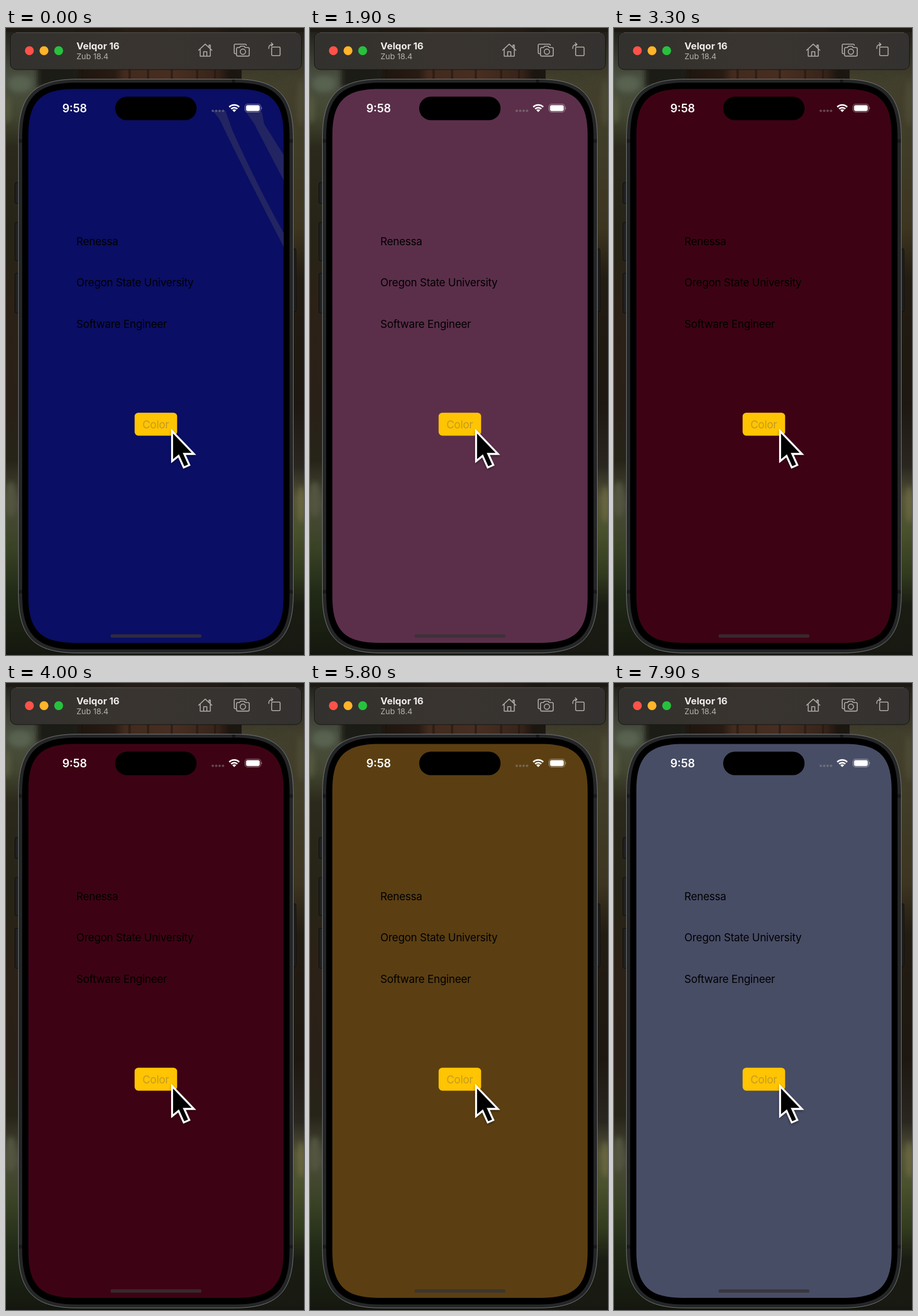
An HTML page that plays this animation: 516 px wide and 1085 px high, repeating every 8000 ms.

```html
<!DOCTYPE html>
<html lang="en">
<head>
<meta charset="utf-8">
<title>Color button</title>
<style>
html, body { margin: 0; width: 100%; height: 100%; overflow: hidden; background: #15150f; }
svg { display: block; width: 516px; height: 1085px; }
text { font-family: Inter, Roboto, sans-serif; }
.label { font-size: 18.5px; letter-spacing: -0.24px; }
</style>
</head>
<body>
<svg viewBox="0 0 516 1085">
  <defs>
    <linearGradient id="left" x2="0" y2="1">
      <stop offset="0" stop-color="#201f18"/>
      <stop offset=".08" stop-color="#4b5142"/>
      <stop offset=".14" stop-color="#424630"/>
      <stop offset=".19" stop-color="#2b291b"/>
      <stop offset=".32" stop-color="#262417"/>
      <stop offset=".45" stop-color="#2c2117"/>
      <stop offset=".6" stop-color="#292017"/>
      <stop offset=".69" stop-color="#262418"/>
      <stop offset=".76" stop-color="#4b4b38"/>
      <stop offset=".83" stop-color="#394225"/>
      <stop offset=".9" stop-color="#212a16"/>
      <stop offset="1" stop-color="#14170e"/>
    </linearGradient>
    <linearGradient id="right" x2="0" y2="1">
      <stop offset="0" stop-color="#201e16"/>
      <stop offset=".08" stop-color="#423f2d"/>
      <stop offset=".2" stop-color="#403c27"/>
      <stop offset=".32" stop-color="#3d3520"/>
      <stop offset=".4" stop-color="#221c13"/>
      <stop offset=".6" stop-color="#1e1711"/>
      <stop offset=".7" stop-color="#2a2720"/>
      <stop offset=".75" stop-color="#555338"/>
      <stop offset=".8" stop-color="#4a512d"/>
      <stop offset=".87" stop-color="#323b1e"/>
      <stop offset=".92" stop-color="#1a1c13"/>
      <stop offset="1" stop-color="#181912"/>
    </linearGradient>
    <linearGradient id="trunk">
      <stop offset="0" stop-color="#1d150f"/>
      <stop offset=".24" stop-color="#281b13"/>
      <stop offset=".3" stop-color="#422a1e"/>
      <stop offset=".6" stop-color="#482e21"/>
      <stop offset=".85" stop-color="#37241a"/>
      <stop offset=".93" stop-color="#1c1510"/>
      <stop offset="1" stop-color="#1c1711"/>
    </linearGradient>
    <linearGradient id="bar">
      <stop offset="0" stop-color="#32312d"/>
      <stop offset=".45" stop-color="#393430"/>
      <stop offset="1" stop-color="#343230"/>
    </linearGradient>
    <filter id="soft" x="-50%" y="-50%" width="200%" height="200%"><feGaussianBlur stdDeviation="4"/></filter>
    <filter id="shadow" x="-30%" y="-30%" width="170%" height="170%">
      <feDropShadow dx="0" dy="2" stdDeviation="2" flood-opacity=".4"/>
    </filter>
    <clipPath id="clip"><path id="clipShape"/></clipPath>
  </defs>

  <!-- forest -->
  <rect width="260" height="1085" fill="url(#left)"/>
  <rect x="260" width="256" height="1085" fill="url(#right)"/>
  <rect x="118" width="290" height="100" fill="url(#trunk)"/>
  <path d="M214 70V92M246 70V92M287 70V92M331 70V92M362 70V92" stroke="#24170f" stroke-width="4" opacity=".6"/>
  <g filter="url(#soft)">
    <rect x="54" y="60" width="72" height="44" fill="#1f1e16"/>
    <ellipse cx="24" cy="97" rx="20" ry="14" fill="#59624f"/>
    <ellipse cx="2" cy="140" rx="6" ry="24" fill="#55583f"/>
    <ellipse cx="460" cy="84" rx="30" ry="7" fill="#3c3e2a"/>
    <ellipse cx="511" cy="130" rx="6" ry="40" fill="#4e4b34"/>
    <ellipse cx="8" cy="815" rx="10" ry="30" fill="#525441"/>
    <ellipse cx="511" cy="825" rx="6" ry="32" fill="#6a683f"/>
  </g>
  <rect width="516" height="7" fill="#1d1912" opacity=".75"/>
  <rect y="1079" width="516" height="6" fill="#151711" opacity=".7"/>

  <!-- toolbar -->
  <rect x="7.5" y="7" width="504" height="65" rx="10" fill="url(#bar)" stroke="#171512"/>
  <path d="M17 8H502" stroke="#57524d"/>
  <circle cx="40.5" cy="39.2" r="7.7" fill="#ff5249"/>
  <circle cx="65.8" cy="39.2" r="7.7" fill="#ffb429"/>
  <circle cx="91.2" cy="39.2" r="7.7" fill="#27c23d"/>
  <text x="122" y="36.5" font-size="16.5" font-weight="700" fill="#efedeb">Velqor 16</text>
  <text x="122" y="54" font-size="13.7" fill="#b5b2ae">Zub 18.4</text>
  <g fill="none" stroke="#b1aeaa" stroke-width="1.6" stroke-linejoin="round" stroke-linecap="round">
    <path d="M333.5 38.5L345 27.8L356.5 38.5M336.3 36.5V48.7H353.7V36.5M351.5 33.5V29.5H353.7V35.5M342.3 48.5V41H347.7V48.5"/>
    <path d="M398 44.5H397.2Q395.2 44.5 395.2 42.5V30Q395.2 28 397.2 28H414Q416 28 416 30"/>
    <path d="M401.5 33.8H404.5L406 31.5H412.5L414 33.8H418.8Q421.2 33.8 421.2 36V46.4Q421.2 48.6 418.8 48.6H401.5Q399.2 48.6 399.2 46.4V36Q399.2 33.8 401.5 33.8Z"/>
    <circle cx="410.2" cy="41" r="4.6"/>
    <rect x="460" y="33" width="14.6" height="14.7" rx="1.5"/>
    <path d="M455 35.5Q454.5 28.5 462 28.5M459.5 25.8L462.3 28.5L459.5 31.2"/>
  </g>

  <!-- device -->
  <g fill="#202021" stroke="#0d0d0d">
    <rect x="15.5" y="267.5" width="8" height="36" rx="2"/>
    <rect x="15.5" y="336.5" width="8" height="66" rx="2"/>
    <rect x="15.5" y="424.5" width="8" height="69" rx="2"/>
    <rect x="494" y="382" width="8" height="109" rx="2"/>
  </g>
  <path id="body" fill="#252627" stroke="#77787a"/>
  <path d="M22 195.5H29M490 195.5H497M22 975.5H29M490 975.5H497M394 89V96" stroke="#19191a" stroke-width="6"/>
  <path id="bezel" fill="#000"/>
  <path id="screen"/>
  <g id="streaks" clip-path="url(#clip)" fill="#232462">
    <path d="M357 143H380L392 177Q437 277 481 355V379Q425 272 376 171Q370 155 357 143Z"/>
    <path d="M415 145H443L447 166L481 220V264Q450 205 430 166Z"/>
  </g>

  <!-- status bar -->
  <rect x="189" y="118.7" width="141" height="40.8" rx="20.4" fill="#000"/>
  <text x="97.4" y="145.8" font-size="19.4" font-weight="600" fill="#fff">9:58</text>
  <g fill="#9a9a96" opacity=".45">
    <circle cx="358" cy="143.3" r="2.1"/><circle cx="364" cy="143.3" r="2.1"/>
    <circle cx="369.9" cy="143.3" r="2.1"/><circle cx="375.8" cy="143.3" r="2.1"/>
  </g>
  <g fill="none" stroke="#fff" stroke-width="2.8">
    <path d="M386.6 136.7A12.2 12.2 0 0 1 403.8 136.7"/>
    <path d="M389.8 140.1A7.7 7.7 0 0 1 400.6 140.1"/>
  </g>
  <path d="M395.2 145.6L391.9 142.2A4.7 4.7 0 0 1 398.5 142.2Z" fill="#fff"/>
  <rect x="413.8" y="131.8" width="27.4" height="13.6" rx="4.5" fill="none" stroke="#fff" stroke-opacity=".45" stroke-width="1.1"/>
  <rect x="415.6" y="133.5" width="23.8" height="10.2" rx="2.9" fill="#fff"/>
  <path d="M442.3 136.4Q444.4 138.6 442.3 140.8Z" fill="#fff" opacity=".5"/>

  <!-- content -->
  <g class="label">
    <text x="121.8" y="375.6">Renessa</text>
    <text x="121.8" y="446.6">Oregon State University</text>
    <text x="121.8" y="519.4">Software Engineer</text>
    <rect x="222.7" y="665.7" width="73.6" height="39.8" rx="6.5" fill="#ffc402"/>
    <text x="236.3" y="692.6" fill="#c69b20">Color</text>
  </g>
  <rect x="181" y="1049.3" width="157.5" height="5.8" rx="2.9" fill="#363235" opacity=".8"/>
  <path d="M287.6 697.5V749.6L298.8 740.4L307.8 760.4L317.4 756.2L308.6 737H325.4Z"
        stroke="#fff" stroke-width="3.3" stroke-miterlimit="6" filter="url(#shadow)"/>
</svg>
<script>
const $ = id => document.getElementById(id);
const LOOP = 8000;

// Start time and screen colour of each tap
const taps = [
  [0, '#0a0e64'],
  [1000, '#5b2f4a'],
  [2600, '#3d0314'],
  [4100, '#3c1b64'],
  [5300, '#5b3f12'],
  [6300, '#064d20'],
  [7300, '#484d66']
];

// Rectangle with continuous-curvature corners
function smoothRect(x, y, w, h, r) {
  const e = r * 1.3, c = r * 0.348, R = x + w, B = y + h;
  return `M${x + e} ${y}H${R - e}C${R - c} ${y} ${R} ${y + c} ${R} ${y + e}` +
    `V${B - e}C${R} ${B - c} ${R - c} ${B} ${R - e} ${B}` +
    `H${x + e}C${x + c} ${B} ${x} ${B - c} ${x} ${B - e}` +
    `V${y + e}C${x} ${y + c} ${x + c} ${y} ${x + e} ${y}Z`;
}

$('body').setAttribute('d', smoothRect(21.5, 88.5, 476, 993, 79));
$('bezel').setAttribute('d', smoothRect(28, 94.5, 463, 981, 73));
for (const id of ['screen', 'clipShape']) {
  $(id).setAttribute('d', smoothRect(38.7, 105.5, 442, 958.5, 62));
}

function draw(ms) {
  const t = ms % LOOP;
  const [start, color] = taps.findLast(tap => tap[0] <= t);
  $('screen').setAttribute('fill', color);
  $('streaks').style.display = start === 0 ? '' : 'none';
}

let origin;
function tick(now) {
  origin ??= now;
  draw(now - origin);
  requestAnimationFrame(tick);
}
draw(0);
requestAnimationFrame(tick);
</script>
</body>
</html>
```
